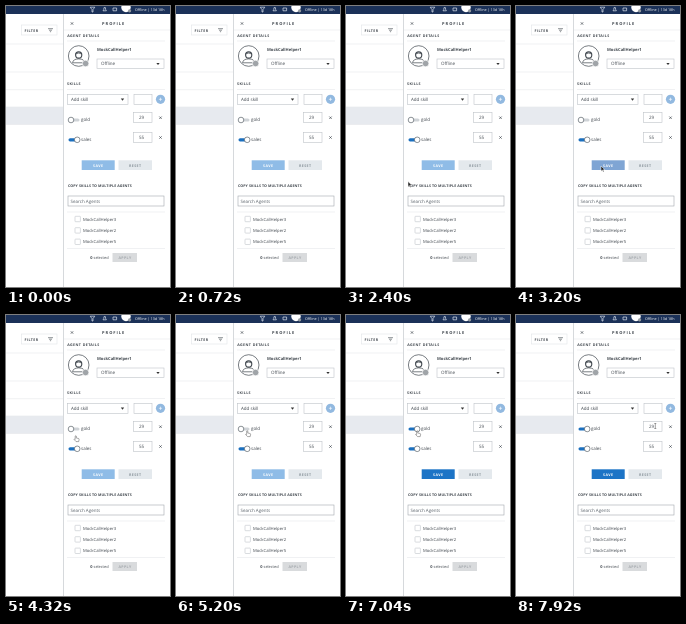
An HTML page for the animation above (8 s loop, 164 px wide and 281 px high).

```html
<!DOCTYPE html>
<html lang="en">
<head>
<meta charset="utf-8">
<title>Agent profile panel</title>
<style>
  html, body { margin: 0; width: 100%; height: 100%; overflow: hidden; background: #fff; }
  svg { display: block; width: 164px; height: 281px; }
  text { font: 4.5px "Open Sans", sans-serif; fill: #40474e; text-rendering: geometricPrecision; }
  .head { font-size: 3.6px; font-weight: 700; letter-spacing: .4px; }
  .title { font-size: 4px; font-weight: 700; letter-spacing: 1px; }
  .bold { font-weight: 700; }
  .mid { text-anchor: middle; }
  .small { font-size: 3.9px; }
  .field { fill: #fff; stroke: #bfc4c9; stroke-width: .6; }
  .rule { stroke: #e6e8eb; stroke-width: .6; }
  .cross { stroke: #40474e; stroke-width: .7; }
</style>
</head>
<body>
<svg viewBox="0 0 164 281">
  <defs>
    <path id="cross" class="cross" d="M-1.2-1.2 1.2 1.2M1.2-1.2-1.2 1.2"/>
    <path id="caret" fill="#333" d="M-1.7-.9H1.7L0 1.2z"/>
  </defs>

  <!-- table behind the panel -->
  <rect y="101" width="57" height="17.5" fill="#e7eaef"/>
  <path class="rule" d="M0 38H57M0 66H57M0 83.7H57M0 101H57M0 118.5H57"/>
  <rect x="15.5" y="19" width="35.5" height="10" fill="#fff" stroke="#e2e5e8" stroke-width=".6"/>
  <text class="head" x="18.5" y="25.5">FILTER</text>
  <path d="M42 22.7h5M43 24.2h3M43.9 25.7h1.2" stroke="#40474e" stroke-width=".6"/>

  <!-- panel -->
  <rect x="57.5" y="8" width="106.5" height="273" fill="#fff"/>
  <path d="M57.5 8V281" stroke="#d6d9dc" stroke-width="1"/>
  <path class="rule" d="M58 24H164M61 35H159M61 83.5H159M61 206H159M61 242.5H159"/>
  <use href="#cross" x="66" y="17.5"/>
  <text class="title" x="96" y="19">PROFILE</text>
  <text class="head" x="61.3" y="30.8">AGENT DETAILS</text>

  <g fill="#fff" stroke="#40474e" stroke-width=".7">
    <circle cx="72.7" cy="50" r="10.3"/>
    <path d="M66.6 56.8q.4-3.9 6.1-3.9t6.1 3.9z"/>
    <circle cx="72.7" cy="49" r="3.1" stroke-width="1.1"/>
    <path d="M69.4 48q3.3-1.8 6.6 0" fill="none"/>
    <circle cx="79.6" cy="57.5" r="3.3" fill="#a0a4a8" stroke="#fff"/>
  </g>
  <text class="bold" x="91" y="44.6" style="font-size:4.1px">MockCallHelper1</text>
  <rect class="field" x="91" y="53" width="67" height="9.5"/>
  <text x="95" y="59.4">Offline</text>
  <use href="#caret" x="152" y="57.8"/>

  <text class="head" x="61" y="79.3">SKILLS</text>
  <rect class="field" x="61.5" y="88.5" width="60.5" height="10"/>
  <text x="65" y="95">Add skill</text>
  <use href="#caret" x="116.5" y="93.5"/>
  <rect class="field" x="128" y="88.5" width="18" height="10"/>
  <circle cx="154.5" cy="93.3" r="4.6" fill="#92b9e0"/>
  <path d="M152.9 93.3h3.2M154.5 91.7v3.2" stroke="#fff" stroke-width=".6"/>

  <rect class="field" x="127.5" y="106.5" width="18.5" height="10"/>
  <text class="mid" x="135.5" y="113">29</text>
  <use href="#cross" x="154.5" y="111.7"/>
  <rect class="field" x="127.5" y="126.3" width="18.5" height="10"/>
  <text class="mid" x="135.5" y="132.8">55</text>
  <use href="#cross" x="154.5" y="131.5"/>

  <g id="gold">
    <rect x="62.5" y="112.4" width="11" height="3.2" rx="1.6" fill="#cfd3d7"/>
    <circle cx="65" cy="114" r="2.8" fill="#fff" stroke="#5b636a" stroke-width=".7"/>
  </g>
  <text x="75" y="114.9">gold</text>
  <rect x="62.5" y="132.2" width="11" height="3.2" rx="1.6" fill="#1c70bf"/>
  <circle cx="71.2" cy="133.8" r="2.8" fill="#fff" stroke="#5b636a" stroke-width=".7"/>
  <text x="75" y="134.7">sales</text>

  <rect id="save" x="75.7" y="154.3" width="33" height="9.7"/>
  <text class="head mid" x="92.2" y="160.5" style="fill:#fff">SAVE</text>
  <rect x="112.5" y="154.3" width="33.5" height="9.7" fill="#e4e9ed"/>
  <text class="head mid" x="129.2" y="160.5" style="fill:#8a949b">RESET</text>

  <text class="head" x="62" y="180.5" style="letter-spacing:.08px">COPY SKILLS TO MULTIPLE AGENTS</text>
  <rect class="field" x="62" y="190" width="96" height="10" style="stroke:#a3a9af"/>
  <text x="64.5" y="196.7" style="fill:#596169">Search Agents</text>
  <g id="agents"></g>
  <text class="small" x="84.3" y="253"><tspan class="bold">0</tspan> selected</text>
  <rect x="106.5" y="247" width="24.5" height="9" fill="#d9dbdd"/>
  <text class="head mid" x="119" y="252.9" style="fill:#a3a8ac">APPLY</text>

  <!-- top bar -->
  <rect width="164" height="8" fill="#1b3158"/>
  <path d="M84.2 1.2h4.6L87 3.6V6h-1V3.6zM97 4.8q1-1 1-3.2h1.4q0 2.2 1 3.2zM107 2h3.6v2.8H107z"
    fill="none" stroke="#dbe3ee" stroke-width=".7"/>
  <circle cx="120" cy="1.5" r="4.7" fill="#fff"/>
  <circle cx="123.6" cy="4.8" r="1.6" fill="#949a9f"/>
  <text x="129" y="5.2" style="font-size:3.7px;fill:#fff">Offline | 13d 18h</text>

  <g id="cursor" stroke-width=".5" stroke-linejoin="round">
    <path id="arrow" fill="#222" stroke="#fff" d="M0 0v5.2l1.3-1.1.9 1.9.9-.4-.9-1.8h1.7z"/>
    <path id="hand" fill="#fff" stroke="#555" d="M.2.5q.6-.8 1.1 0v2l2.3.5q.6.2.5.9l-.4 2.2H1L-.9 3.9q.2-.8 1.1 0z"/>
    <path id="beam" fill="none" stroke="#444" d="M-1 0H1M0 0V5M-1 5H1"/>
  </g>
</svg>
<script>
const LOOP = 8000, CLICK = 6720;
const HAND_FROM = 3640, BEAM_FROM = 7640;
const $ = id => document.getElementById(id);

// time, x, y of the pointer tip
const route = [
  [1840, -5, 184], [2320, 62, 175.5], [2480, 62, 175.5], [2640, 70, 167],
  [3040, 85, 160], [3560, 85, 160], [4320, 69, 120.5], [4640, 69, 120.5],
  [5040, 70.5, 115.5], [7360, 70.5, 115.5], [7800, 139.3, 108.5], [LOOP, 139.3, 108.5]
];

const clamp = v => Math.min(1, Math.max(0, v));
const ease = v => v * v * (3 - 2 * v);
const show = (id, on) => $(id).setAttribute('visibility', on ? 'visible' : 'hidden');

$('agents').innerHTML = [3, 2, 5].map((n, i) => {
  const y = 210.3 + i * 11.4;
  return `<rect class="field" x="69" y="${y}" width="5.4" height="5.4" rx=".6"/>
    <text x="77" y="${y + 4.3}" style="font-size:4.2px">MockCallHelper${n}</text>`;
}).join('');

const [track, knob] = $('gold').children;

function pointer(t) {
  const i = Math.max(1, route.findIndex(p => p[0] > t));
  const [t0, x0, y0] = route[i - 1], [t1, x1, y1] = route[i];
  const k = ease(clamp((t - t0) / (t1 - t0)));
  return [x0 + (x1 - x0) * k, y0 + (y1 - y0) * k];
}

function draw(now) {
  const t = now % LOOP;
  const on = t >= CLICK;
  const [x, y] = pointer(t);
  const hover = x > 76 && x < 109 && y > 154 && y < 164;
  knob.setAttribute('cx', 65 + 6.2 * ease(clamp((t - CLICK) / 160)));
  track.setAttribute('fill', on ? '#1c70bf' : '#cfd3d7');
  $('save').setAttribute('fill', on ? '#1c74c6' : hover ? '#7fa5d4' : '#8fbce7');

  $('cursor').setAttribute('transform', `translate(${x} ${y})`);
  show('arrow', t >= route[0][0] && t < HAND_FROM);
  show('hand', t >= HAND_FROM && t < BEAM_FROM);
  show('beam', t >= BEAM_FROM);
  requestAnimationFrame(draw);
}
requestAnimationFrame(draw);
</script>
</body>
</html>
```
